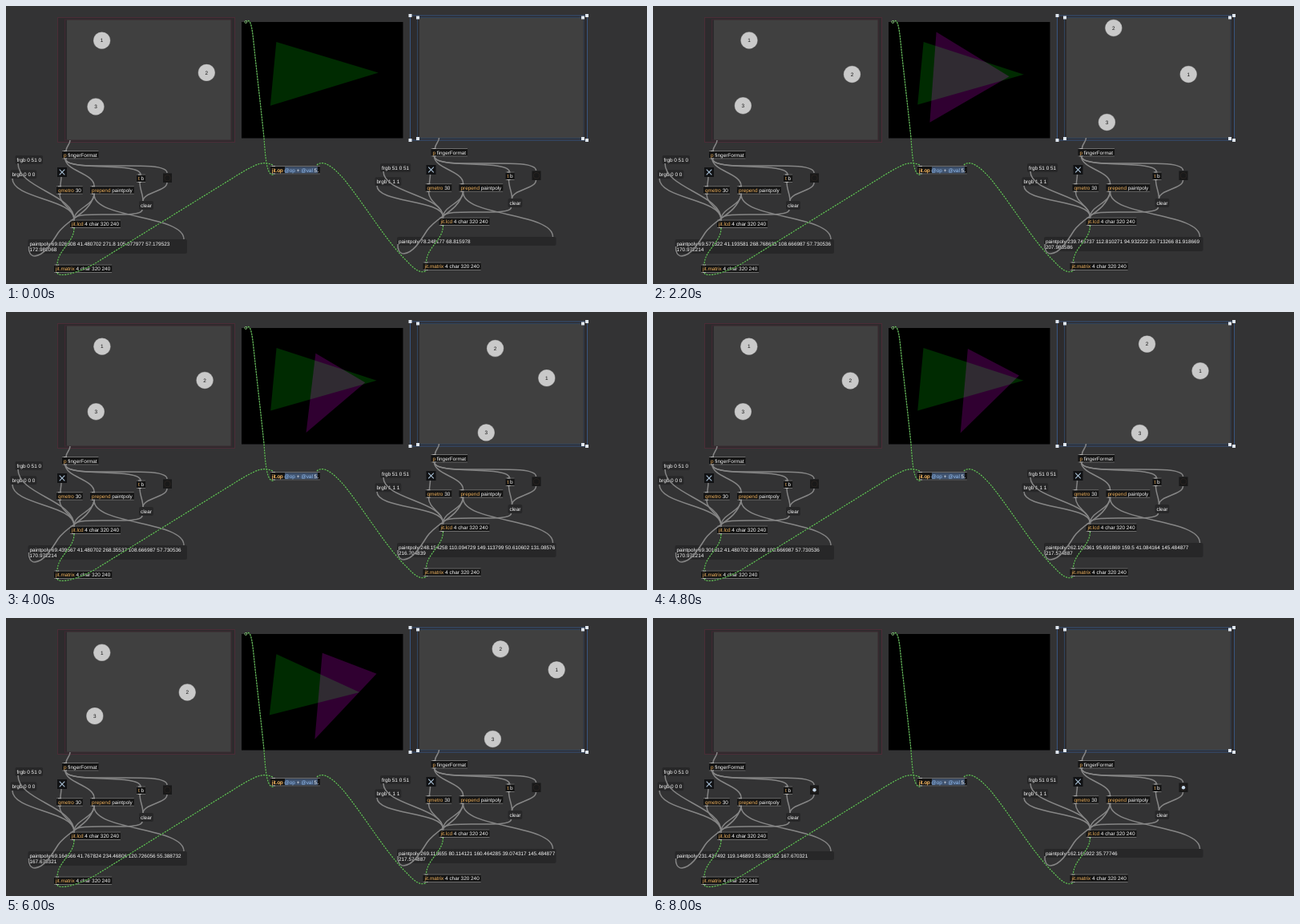
An HTML page with a canvas for the animation above (8.1 s loop, 800 px wide and 348 px high).

```html
<!DOCTYPE html>
<html lang="en">
<head>
<meta charset="utf-8">
<title>Patch</title>
<style>
html, body { margin: 0; width: 100%; height: 100%; overflow: hidden; background: #333334; }
canvas { display: block; width: 800px; height: 348px; }
</style>
</head>
<body>
<canvas id="stage" width="800" height="348"></canvas>
<script>
const ctx = document.getElementById('stage').getContext('2d');
const LOOP = 8100, STEP = 100, LIFT = 7900, TOUCH = 1800;
const LEAD = 100, LAG = 150; // dots run ahead of the numbers, the video behind
const FONT = '6.4px "Liberation Sans", Arial, sans-serif';
const WHITE = '#fafafa', ORANGE = '#f2b45f', BLUE = '#94c0f4';

// One path per finger: [time, x, y] in the 320 x 240 touch area.
const leftHand = [
  [[0, 69.026308, 41.480702], [2200, 69.577322, 41.193581], [6000, 69.164566, 41.767824]],
  [[0, 271.8, 105.077977], [2200, 268.768635, 108.666987], [4800, 268.08, 108.666987],
    [6000, 234.46806, 120.726056], [LIFT, 231.437492, 119.146893]],
  [[1400, 57.179523, 172.982068], [2200, 57.730536, 170.972214], [5000, 57.730536, 170.972214],
    [6000, 55.388732, 167.670321]]
];
const rightHand = [
  [[2400, 239.745737, 112.810271], [3200, 234.241003, 124.450779], [4800, 262.105361, 95.691869],
    [6000, 269.113655, 80.114121]],
  [[2400, 94.932222, 20.713266], [3200, 138.644419, 60.085595], [4800, 159.5, 41.084164],
    [LIFT, 162.165922, 35.77746]],
  [[2400, 81.918669, 207.988586], [3200, 116.621485, 215.556355], [4800, 145.484877, 217.574887]]
];

// Linear between points, in steps of the touch sensor.
function along(path, t) {
  const i = path.findIndex(p => p[0] > t);
  if (i === 0) return path[0].slice(1);
  if (i < 0) return path[path.length - 1].slice(1);
  const [a, b] = [path[i - 1], path[i]], k = (t - a[0]) / (b[0] - a[0]);
  const move = (n, unit) => a[n] + Math.round((b[n] - a[n]) * k / unit) * unit;
  return [move(1, 0.137755), move(2, 0.287121)];
}

const fingers = (hand, t) => hand.map(path => along(path, t));

function rect(x, y, w, h, fill) {
  ctx.fillStyle = fill;
  ctx.fillRect(x, y, w, h);
}

function outline(x, y, w, h, color) {
  ctx.strokeStyle = color;
  ctx.lineWidth = 1;
  ctx.strokeRect(x, y, w, h);
}

function disc(x, y, r, fill) {
  ctx.fillStyle = fill;
  ctx.beginPath();
  ctx.arc(x, y, r, 0, 7);
  ctx.fill();
}

// Draws coloured words one after another.
function words(x, y, ...parts) {
  for (const [str, color] of parts) {
    ctx.fillStyle = color;
    ctx.fillText(str, x, y);
    x += ctx.measureText(str).width;
  }
}

function box(x, y, name, rest) {
  const w = ctx.measureText(name + rest).width + 4;
  rect(x, y, w, 10.5, '#141414');
  for (const edge of [y, y + 9.5]) {
    rect(x, edge, w, 1, '#6c6c6c');
    rect(x + 2, edge, 4, 1, '#b4b4b4');
  }
  words(x + 2, y + 7.5, [name, ORANGE], [rest, WHITE]);
}

function message(x, y, lines, w) {
  ctx.fillStyle = '#272728';
  ctx.beginPath();
  ctx.roundRect(x, y, w || ctx.measureText(lines[0]).width + 4, 4 + 7 * lines.length, 2);
  ctx.fill();
  lines.forEach((s, i) => words(x + 2, y + 7.6 + 7 * i, [s, WHITE]));
}

// Leaves downwards and arrives from above.
function hang(x1, y1, x2, y2) {
  const k = (y2 - y1) * 0.35 + Math.abs(x2 - x1) * 0.1;
  return `M${x1} ${y1}C${x1} ${y1 + k} ${x2} ${y2 - k} ${x2} ${y2}`;
}

function cord(d) {
  ctx.strokeStyle = '#868686';
  ctx.lineWidth = 1.5;
  ctx.stroke(new Path2D(d));
}

function matrixCord(d) {
  const p = new Path2D(d);
  ctx.lineWidth = 1.1;
  ctx.strokeStyle = '#2c4a2a';
  ctx.stroke(p);
  ctx.setLineDash([1.9, 1.5]);
  ctx.strokeStyle = '#6ccb60';
  ctx.stroke(p);
  ctx.setLineDash([]);
}

function panel(x, y, edge, inner) {
  rect(x, y, 222, 157, '#2d2b2d');
  outline(x + 0.5, y + 0.5, 221, 156, edge);
  outline(x + 9.5, y + 3, 207.5, 151, inner);
  rect(x + 12, y + 3.5, 204.5, 150, '#404040');
}

function handles(x, y, w, h) {
  for (const px of [x, x + w]) for (const py of [y, y + h]) rect(px - 2, py - 2, 4, 4, '#dfe6ee');
}

function triangle(points, color) {
  ctx.fillStyle = color;
  ctx.beginPath();
  for (const [x, y] of points) ctx.lineTo(294 + x * 0.628, 20 + y * 0.605);
  ctx.fill();
}

function dots(points, left, top) {
  ctx.textAlign = 'center';
  points.forEach(([px, py], i) => {
    const x = left + px * 0.645, y = top + py * 0.63;
    disc(x, y, 10.7, '#8a8a8a');
    disc(x, y, 10.3, '#c9c9c9');
    words(x, y + 2.3, [i + 1, '#111']);
  });
  ctx.textAlign = 'left';
}

function listLines(points) {
  const list = ['paintpoly', ...points.flat().map(n => String(+n.toFixed(6)))];
  return list.length > 6 ? [list.slice(0, 6).join(' '), list[6]] : [list.join(' ')];
}

function patch(dx, dy, points, lit) {
  ctx.save();
  ctx.translate(dx, dy);
  box(70, 181, 'p ', 'fingerFormat');
  box(63, 225.2, 'qmetro ', '30');
  box(105, 225.2, 'prepend ', 'paintpoly');
  box(163, 210.5, 't ', 'b');
  message(166, 244, ['clear']);
  box(80, 267.5, 'jit.lcd ', '4 char 320 240');
  message(27.5, 292, listLines(points), 198.5);
  box(60, 323.5, 'jit.matrix ', '4 char 320 240');

  rect(64, 202, 12, 12, '#111214');
  ctx.strokeStyle = '#a9c0d6';
  ctx.lineWidth = 1.1;
  ctx.stroke(new Path2D('M66.7 204.7l6.6 6.6m0-6.6l-6.6 6.6'));

  rect(196, 209.5, 11, 11.5, '#191919');
  disc(201.5, 215.2, 4, '#2b2522');
  disc(201.5, 215.2, 3.2, '#191919');
  if (lit) disc(201.5, 215.2, 2.2, '#c6d7e8');

  const lcd = [85, 267], clear = [171, 244];
  cord(hang(80, 168, 75, 181));
  for (const inlet of [[110, 225], [168, 211], [201, 209]]) cord(hang(74, 191, ...inlet));
  for (const outlet of [[67, 236], [110, 236], [170, 255]]) cord(hang(...outlet, ...lcd));
  for (const outlet of [[167, 221], [201, 221]]) cord(hang(...outlet, ...clear));
  cord(hang(69, 214, 68, 225));
  cord(hang(110, 236, 222, 292));
  cord('M110 236C104 261 78 265 65 284C55 300 47 312 36 313C30 313 28 307 28.5 301');
  matrixCord(hang(85, 278, 64, 324));
  ctx.restore();
}

function draw(t) {
  const touching = t < LIFT, both = touching && t >= TOUCH;
  const left = fingers(leftHand, t), right = fingers(rightHand, t);

  ctx.font = FONT;
  ctx.textRendering = 'geometricPrecision';
  rect(0, 0, 800, 348, '#333334');
  panel(64, 14, '#4c2c37', '#412832');
  panel(504, 11.5, '#38557f', '#30455f');
  handles(504.5, 12, 220.5, 156);
  handles(514, 14.5, 206, 151.5);
  rect(294, 20, 201.5, 145.5, '#000');

  ctx.globalCompositeOperation = 'lighter';
  if (touching) triangle(left, 'rgb(0,43,1)');
  if (both) triangle(fingers(rightHand, t - LAG), 'rgb(48,0,49)');
  ctx.globalCompositeOperation = 'source-over';

  if (touching) dots(fingers(leftHand, t + LEAD), 75.1, 17);
  if (both) dots(fingers(rightHand, t + LEAD), 513.6, 14.4);

  message(11.5, 187, ['frgb 0 51 0']);
  message(5.5, 205.3, ['brgb 0 0 0']);
  message(467, 197, ['frgb 51 0 51']);
  message(460.5, 214.3, ['brgb 1 1 1']);

  patch(0, 0, touching ? left : left.slice(1), !touching);
  patch(460.5, -3, both ? right : touching ? [[78.248177, 68.815978]] : [right[1]], !touching);

  for (const [x, y] of [[15, 197], [8, 216]]) cord(hang(x, y, 85, 267));
  for (const [x, y] of [[471, 207], [463, 225]]) cord(hang(x, y, 545.5, 264));

  box(330, 200, 'jit.op ', '@op + @val 5.');
  rect(348, 201.3, 41, 8, '#40536f');
  words(332, 207.5, ['jit.op ', ORANGE], ['@op ', BLUE], ['+ ', WHITE], ['@val ', BLUE], ['5.', WHITE]);

  matrixCord('M64 334C66 340 88 335 110 323L290 211C310 199 320 193 333 199');
  matrixCord('M299 20C305 14 307 25 309 45C313 85 318 125 322 165C324 195 326 214 335 211');
  matrixCord('M388 199C396 192 408 201 422 217C450 252 475 295 500 319C510 330 518 336 525 331');
  disc(299.3, 20, 1.8, '#9be08f');
  disc(299.3, 20, 1, '#000');
}

const start = performance.now();
let shown = -1;
function tick() {
  const t = Math.floor(((performance.now() - start) % LOOP) / STEP) * STEP;
  if (t !== shown) draw(shown = t);
  requestAnimationFrame(tick);
}
tick();
</script>
</body>
</html>
```
